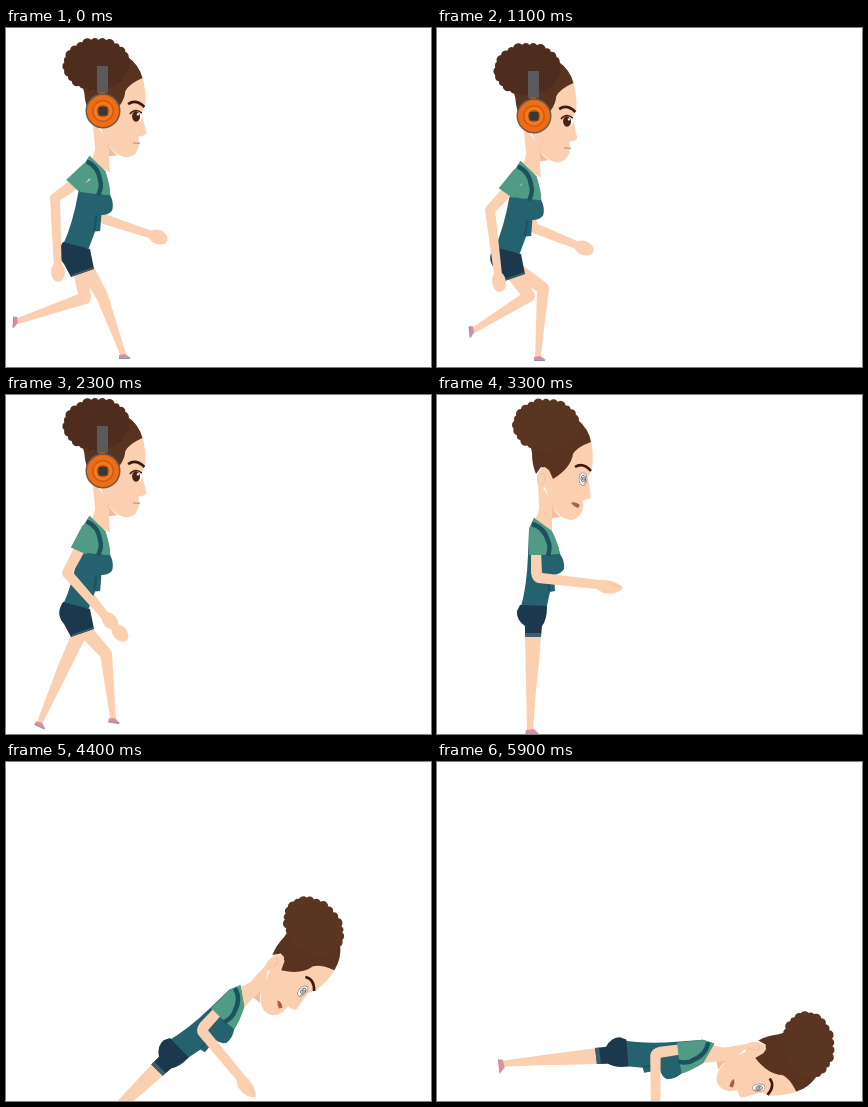
An HTML page with a canvas for the animation above (6000 ms loop, 425 by 339 pixels).

```html
<!DOCTYPE html>
<html lang="en">
<head>
<meta charset="utf-8">
<title>Runner</title>
<style>
html, body { margin: 0; width: 100%; height: 100%; overflow: hidden; background: #fff; }
canvas { display: block; width: 425px; height: 339px; }
</style>
</head>
<body>
<canvas id="stage" width="425" height="339"></canvas>
<script>
const ctx = document.getElementById('stage').getContext('2d');
const LOOP = 6000, STEP = 100, RUN_END = 3000, STRIDE = 1600 / 3;
const SKIN = '#fbd0b1', SHADE = '#f3bd9b', GREEN = '#4f9b85', TEAL = '#23626e', DARK_TEAL = '#1c5260', NAVY = '#1c384d';
const HAIR = '#59331f', BUN = '#5a3522', BUN_RUN = '#4f2d1e', LINE = '#3a1a12', SHOE = '#d98fa2';

// Stride keys: phase in sixteenths, then knee/foot/foot angle or elbow/hand.
const NEAR_LEG = [
  [0, 96, 268, 117, 326, 0], [1, 106, 260, 101, 328, 0], [5, 58, 272, 34, 327, 25],
  [8, 82, 270, 12, 293, 95], [9, 88, 270, 22, 291, 85], [13, 100, 259, 107, 323, 10], [16, 96, 268, 117, 326, 0]];
const FAR_LEG = [
  [0, 98, 266, 117, 326, 0], [1, 101, 264, 99, 328, 0], [5, 58, 272, 34, 327, 25],
  [8, 79, 270, 12, 293, 95], [9, 92, 268, 37, 302, 85], [13, 100, 259, 107, 323, 10], [16, 98, 266, 117, 326, 0]];
const NEAR_ARM = [
  [0, 49, 170, 52, 244], [1, 53, 182, 62, 254], [5, 61, 178, 114, 238],
  [8, 74, 188, 135, 236], [9, 73, 190, 124, 243], [13, 58, 182, 88, 248], [16, 49, 170, 52, 244]];
const FAR_ARM = [
  [0, 98, 191, 152, 209], [1, 97, 200, 147, 220], [5, 78, 195, 104, 226],
  [8, 55, 185, 82, 236], [9, 58, 186, 94, 240], [13, 78, 195, 118, 226], [15, 97, 192, 155, 208], [16, 98, 191, 152, 209]];
const BOB = [[0, 0], [1, 5], [2, 5], [5, -7], [6, -8], [8, 0]];

// Time, tilt in degrees and place of the ear.
const FALL = [
  [3000, 0, 115, 83], [3300, 0, 105, 83], [3500, 0, 105, 83], [3600, 7, 112, 83], [3700, 15, 130, 91],
  [3800, 23, 157, 105], [4000, 31, 206, 139], [4200, 37, 249, 172], [4400, 44, 268, 200],
  [4900, 71, 304, 258], [5200, 80, 314, 276], [5600, 83, 318, 284], [5900, 83.5, 318, 285]];

function sample(keys, x) {
  let i = 1;
  while (i < keys.length - 1 && keys[i][0] < x) i++;
  const a = keys[i - 1], b = keys[i];
  const k = Math.min(1, (x - a[0]) / (b[0] - a[0]));
  return a.slice(1).map((v, n) => v + (b[n + 1] - v) * k);
}

function fill(color, d) {
  ctx.fillStyle = color;
  ctx.fill(new Path2D(d));
}

function line(color, width, d) {
  ctx.strokeStyle = color;
  ctx.lineWidth = width;
  ctx.stroke(new Path2D(d));
}

function oval(color, x, y, rx, ry = rx, turn = 0) {
  ctx.fillStyle = color;
  ctx.beginPath();
  ctx.ellipse(x, y, rx, ry, turn, 0, 7);
  ctx.fill();
}

function turned(x, y, deg, dx, dy, draw) {
  ctx.save();
  ctx.translate(x + dx, y + dy);
  ctx.rotate(deg * Math.PI / 180);
  ctx.translate(-x, -y);
  draw();
  ctx.restore();
}

function taper(color, x1, y1, r1, x2, y2, r2) {
  const a = Math.atan2(y2 - y1, x2 - x1), s = Math.sin(a), c = Math.cos(a);
  ctx.fillStyle = color;
  ctx.beginPath();
  ctx.moveTo(x1 - s * r1, y1 + c * r1);
  ctx.lineTo(x2 - s * r2, y2 + c * r2);
  ctx.lineTo(x2 + s * r2, y2 - c * r2);
  ctx.lineTo(x1 + s * r1, y1 - c * r1);
  ctx.fill();
}

function limb(x, y, [mx, my, ex, ey], r1, r2, r3) {
  taper(SKIN, x, y, r1, mx, my, r2);
  oval(SKIN, mx, my, r2);
  taper(SKIN, mx, my, r2, ex, ey, r3);
  oval(SKIN, ex, ey, r3);
}

function leg(x, y, key) {
  const [, , fx, fy, deg] = key;
  limb(x, y, key, 7.5, 6, 2.8);
  turned(fx, fy, deg, 0, 0, () => {
    fill(SHOE, `M${fx - 4} ${fy + 1}L${fx + 2} ${fy}L${fx + 8} ${fy + 4}L${fx - 4} ${fy + 5}Z`);
    line('#8d8fa6', 1, `M${fx - 4} ${fy + 4.5}H${fx + 7}`);
  });
}

function arm(x, y, key) {
  const [ex, ey, hx, hy] = key;
  limb(x, y, key, 6, 5, 3.8);
  const a = Math.atan2(hy - ey, hx - ex);
  oval(SKIN, hx, hy, 10, 7, a);
}

function bun(color) {
  oval(color, 109, 30, 31, 24);
  for (let i = 0; i < 24; i++) {
    const a = i * Math.PI / 12;
    oval(color, 109 + 29 * Math.cos(a), 30 + 22 * Math.sin(a), 4.6 + 0.6 * Math.sin(i * 2.3));
  }
}

function head(dizzy) {
  fill(SKIN, 'M101 86L102 113Q101 121 96 127L115 139L115 106Z');
  fill(SKIN, 'M112 62L154 44Q157 62 155 74L151 82L154 102Q152 105 146 105L146 113Q144 123 135 125Q126 126 116 113L108 92Z');
  fill(SHADE, 'M116 113Q119 119 124 122L115 123L115 108Z');
  fill(HAIR, 'M92 42L140 24Q152 34 154 47Q140 52 136 59Q134 73 116 84L112 75L104 72L99 79Q95 70 95 58Z');
  bun(dizzy ? BUN : BUN_RUN);
  oval(SKIN, 106, 83, 6, 11, 0.15);
  line(SHADE, 1, 'M104 79Q109 77 108 84Q107 89 104 90');
  line(LINE, 2.6, 'M138 72Q146 67 154 76');
  if (dizzy) {
    oval('#8a7a72', 146, 84, 4.2, 6.6);
    oval('#fff', 146, 84, 3.6, 6);
    ctx.strokeStyle = '#444';
    ctx.lineWidth = 0.9;
    ctx.beginPath();
    for (let a = 0; a < 14; a += 0.3) ctx.lineTo(146 + a * 0.2 * Math.cos(a), 84 + a * 0.34 * Math.sin(a));
    ctx.stroke();
    fill('#a3614a', 'M134 108Q138 106 143 110L141 113Q137 112 134 108Z');
  } else {
    oval('#fff', 146, 85, 5, 5.5);
    oval('#4b2112', 145, 85, 4, 5.2);
    oval('#fff', 147, 83, 1.2);
    line(LINE, 1.4, 'M139 82Q145 76 151 82');
    line('#d18f79', 1.3, 'M140 111L147 112');
  }
}

function torso() {
  fill(TEAL, 'M97 123L113 135Q121 148 123 159Q128 166 127 174Q124 179 117 180L118 196L113 197L109 215L83 215Q90 192 91 160L92 134Z');
  fill(GREEN, 'M97 123L115 136Q121 148 123 159L104 160L92 160L92 134Z');
  line(DARK_TEAL, 4.5, 'M95 129Q107 132 111 146Q114 151 111 161');
  line(DARK_TEAL, 2, 'M112 181L112 196');
}

function standing() {
  fill(SKIN, 'M88 240L104 240Q102 270 99 295L96 336L90 336L89 290Z');
  fill(SHOE, 'M89 335L97 334L103 340L88 340Z');
  head(true);
  torso();
  fill(NAVY, 'M83 210L110 211Q110 225 105 231L104 242L88 242L88 231Q79 225 80 216Z');
  fill('#3d6070', 'M88 238L104 238L104 242L88 242Z');
  fill(SKIN, 'M94 156L104 156L105 178L163 185Q178 184 186 193Q179 201 166 198L160 194L101 188Q95 186 94 178Z');
  line(SHADE, 0.8, 'M173 189L183 192');
  fill(GREEN, 'M93 132Q102 134 106 148L105 160L92 160Z');
}

function headphones() {
  line('#5a5a5d', 11, 'M96.5 38L96.5 65');
  line('#b5500f', 6, 'M96 64L96 72');
  oval('#6b5a52', 97, 83, 17.5);
  oval('#ee6c14', 97, 83, 16);
  oval('#d4590d', 97, 83, 11);
  oval('#f07a20', 97, 83, 9.5);
  oval('#a94a10', 97, 83, 6);
  fill('#37383a', 'M92.5 79H101.5V87.5H92.5Z');
}

function running(t) {
  const phase = t / STRIDE * 16 % 16;
  const [dy] = sample(BOB, phase % 8);
  const far = (phase + 8) % 16;
  const near = sample(NEAR_ARM, phase);
  arm(82, 158 + dy, sample(FAR_ARM, phase));
  leg(73, 236 + dy, sample(FAR_LEG, far));
  leg(78, 236 + dy, sample(NEAR_LEG, phase));
  turned(110, 83, -4, -15, 6 + dy, () => head(false));
  turned(97, 213, 8, -26, 4 + dy, torso);
  ctx.save();
  ctx.translate(0, dy);
  fill(NAVY, 'M57 214Q49 226 58 236L65 249L88 241L84 221Z');
  line('#3d6070', 1.5, 'M66 247.5L87 240');
  headphones();
  ctx.restore();
  const sy = 147 + dy, a = Math.atan2(near[1] - sy, near[0] - 81);
  arm(81, sy, near);
  taper(GREEN, 83, sy - 7, 7, 81 + 18 * Math.cos(a), sy + 18 * Math.sin(a), 8.5);
}

function draw(t) {
  ctx.fillStyle = '#fff';
  ctx.fillRect(0, 0, 425, 339);
  if (t < RUN_END) return running(t);
  const [deg, x, y] = sample(FALL, t);
  turned(105, 83, deg, x - 105, y - 83, standing);
}

const start = performance.now();
function tick() {
  const t = (performance.now() - start) % LOOP;
  draw(Math.floor(t / STEP) * STEP);
  requestAnimationFrame(tick);
}
tick();
</script>
</body>
</html>
```
